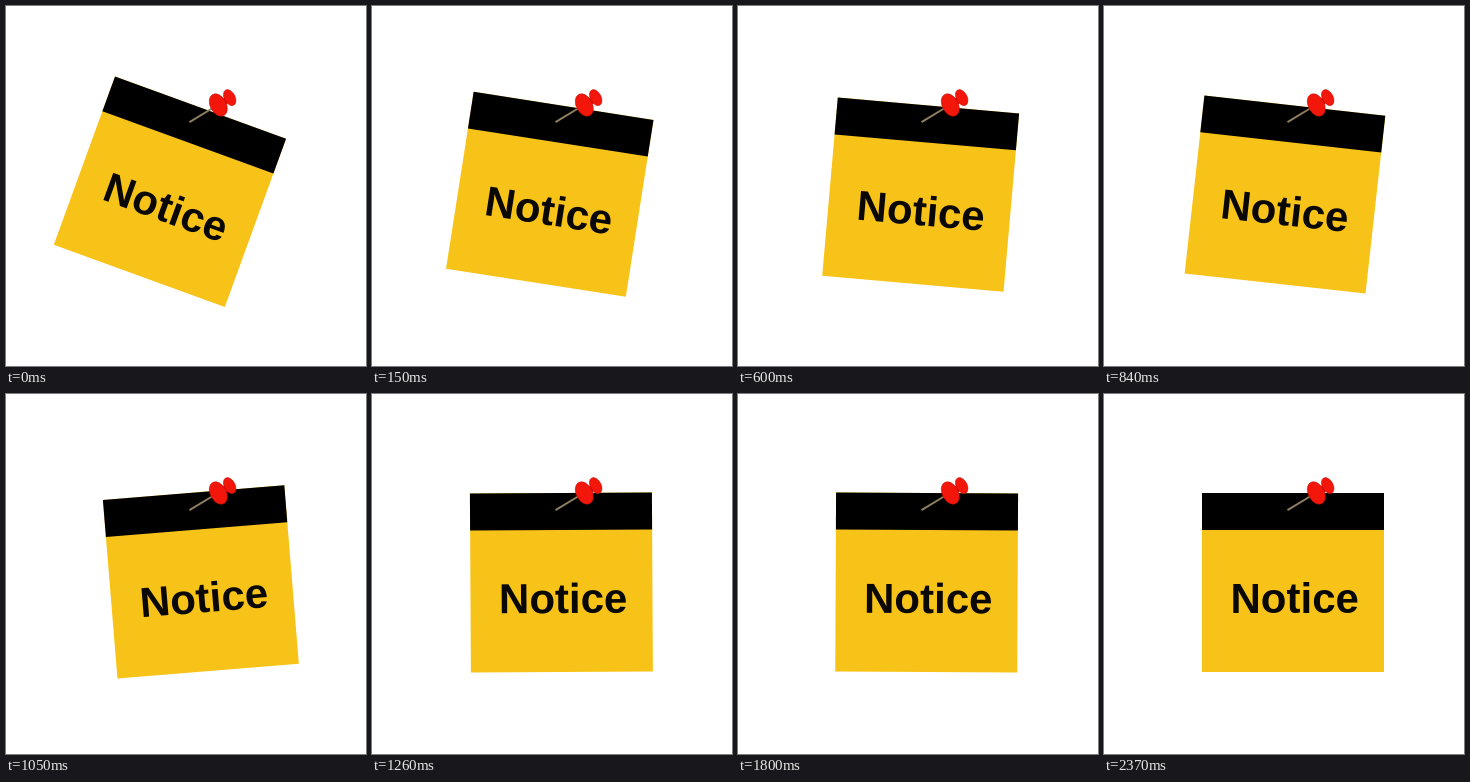
Animation of 360 by 360 pixels, one loop 2.49 s. Source, as an HTML page:

```html
<!DOCTYPE html>
<html lang="en">
<head>
<meta charset="utf-8">
<title>Notice</title>
<style>
  html, body { margin: 0; width: 100%; height: 100%; overflow: hidden; background: #fff; }
  svg { display: block; width: 100%; height: 100%; }
  text { font: bold 42px "Liberation Sans", Arial, sans-serif; }
</style>
</head>
<body>
<svg viewBox="0 0 360 360">
  <g id="note" transform="rotate(20 184.5 116)">
    <rect x="98" y="99" width="182" height="179" fill="#f8c318"/>
    <rect x="98" y="99" width="182" height="37"/>
    <text x="126.5" y="219" fill="#0a0805">Notice</text>
  </g>
  <g id="pin">
    <path d="M183.5 116.2L206 102.5" stroke="#8f7f60" stroke-width="2"/>
    <path d="M214 95L220 90L223 96L217 101Z" fill="#c01008"/>
    <g fill="#f3160a" stroke="#c01008" stroke-width=".5">
      <ellipse cx="212.3" cy="99" rx="8" ry="12" transform="rotate(-28 212.3 99)"/>
      <ellipse cx="223.7" cy="91.6" rx="5.4" ry="8.6" transform="rotate(-28 223.7 91.6)"/>
    </g>
  </g>
</svg>
<script>
  const LOOP = 2490, STEP = 30;
  // [time in ms, angle in degrees] at each turning point of the swing
  const swing = [[0, 20], [360, -10], [720, 10], [1085, -5], [1450, 5], [1860, 0]];
  const note = document.getElementById("note");

  function angleAt(time) {
    const next = swing.findIndex(([t]) => t > time);
    if (next < 0) return 0;
    const [t0, a0] = swing[next - 1], [t1, a1] = swing[next];
    const eased = (1 - Math.cos(Math.PI * (time - t0) / (t1 - t0))) / 2;
    return a0 + (a1 - a0) * eased;
  }

  const start = performance.now();
  function draw() {
    const time = (performance.now() - start) % LOOP;
    const angle = angleAt(Math.floor(time / STEP) * STEP);
    note.setAttribute("transform", `rotate(${angle} 184.5 116)`);
    requestAnimationFrame(draw);
  }
  draw();
</script>
</body>
</html>
```
